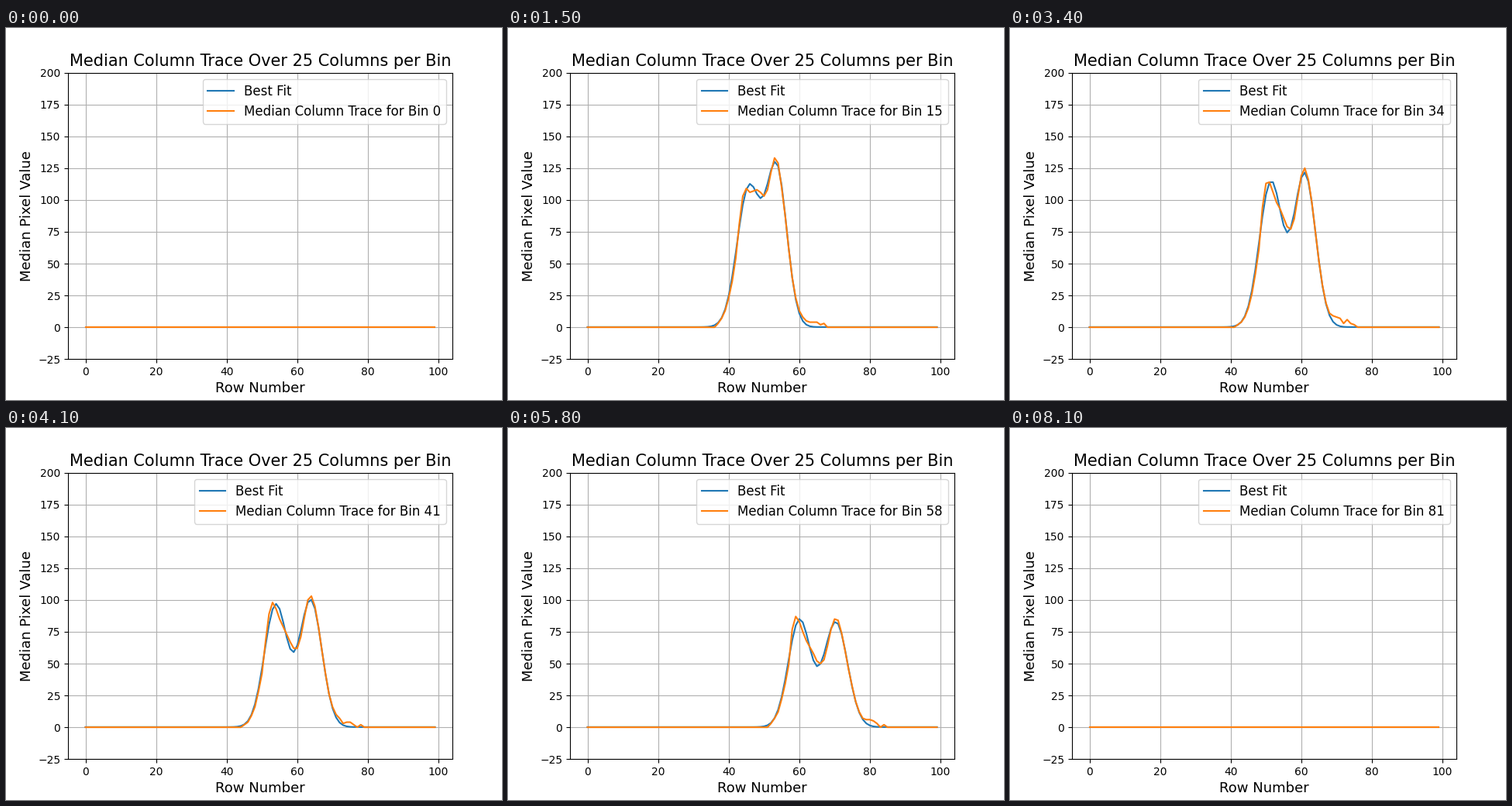
A matplotlib script for the animation above (8.2 s loop, 640x480 px).

```python
import numpy as np
import matplotlib.pyplot as plt
from matplotlib.animation import FuncAnimation

BINS = 82
ROWS = np.arange(100)
BASELINE = 0.15

# Key points of the two peaks as they drift across the bins
KEY_BINS = (0, 15, 24, 34, 49, 68, 80)
LEFT_CENTRE = (41.5, 45.7, 48.25, 51.4, 56.8, 63.7, 68)
RIGHT_CENTRE = (48, 53.6, 57.1, 61, 67.05, 74.05, 78.6)
LEFT_HEIGHT = (113, 109, 105, 114, 75.5, 94, 90)
RIGHT_HEIGHT = (124, 123, 118.5, 120, 76, 89.5, 88)


def at_bin(b, values):
    return np.interp(b, KEY_BINS, values)


def gauss(centre, width):
    return np.exp(-(((ROWS - centre) / width) ** 2) / 2)


def traces(b):
    """Best fit and measured trace of one bin; the outer bins are empty."""
    if b in (0, BINS - 1):
        return np.zeros(100), np.zeros(100)
    c1, c2 = at_bin(b, LEFT_CENTRE), at_bin(b, RIGHT_CENTRE)
    h1, h2 = at_bin(b, LEFT_HEIGHT), at_bin(b, RIGHT_HEIGHT)
    fit = (h1 * gauss(c1, 3.35 - 0.003 * b)
           + h2 * gauss(c2, 2.75 + 0.01 * b))

    # The measured trace ripples around the fit, strongest at the left peak
    gap = c2 - c1
    u = ROWS - c1
    swing = h1 * (0.05 + 0.001 * b) * np.exp(-np.maximum(u, 0) / 10)
    ripple = swing * np.cos(2 * np.pi * (u + 1.8) / (0.6 * gap))
    ridge = (u > -3) & (u < gap + 2)
    data = fit + np.where(ridge, ripple, 0)
    data[u <= -3] *= 0.92

    # Small ragged bumps on the right foot
    rng = np.random.default_rng(b)
    data += 0.04 * h2 * gauss(c2 + 10.5, 2.5) * rng.uniform(0.4, 1.6, 100)
    data = np.round(data)
    data[data < 2] = 0
    return fit + BASELINE, data


fig, ax = plt.subplots(figsize=(6.4, 4.8), dpi=100)
fit_line, = ax.plot(ROWS, 0 * ROWS, label="Best Fit")
data_line, = ax.plot(ROWS, 0 * ROWS, label="Median Column Trace for Bin 0")
ax.set_title("Median Column Trace Over 25 Columns per Bin", fontsize=15)
ax.set_xlabel("Row Number", fontsize=13)
ax.set_ylabel("Median Pixel Value", fontsize=13)
ax.set_xlim(-4.95, 103.95)
ax.set_ylim(-25, 200)
ax.grid(True)
legend = ax.legend(loc="upper right", fontsize=12)


def update(b):
    fit, data = traces(b)
    fit_line.set_ydata(fit)
    data_line.set_ydata(data)
    legend.get_texts()[1].set_text(f"Median Column Trace for Bin {b}")
    return fit_line, data_line, legend


anim = FuncAnimation(fig, update, frames=BINS, interval=100, repeat=True,
                     repeat_delay=0, blit=False)
plt.show()
```
